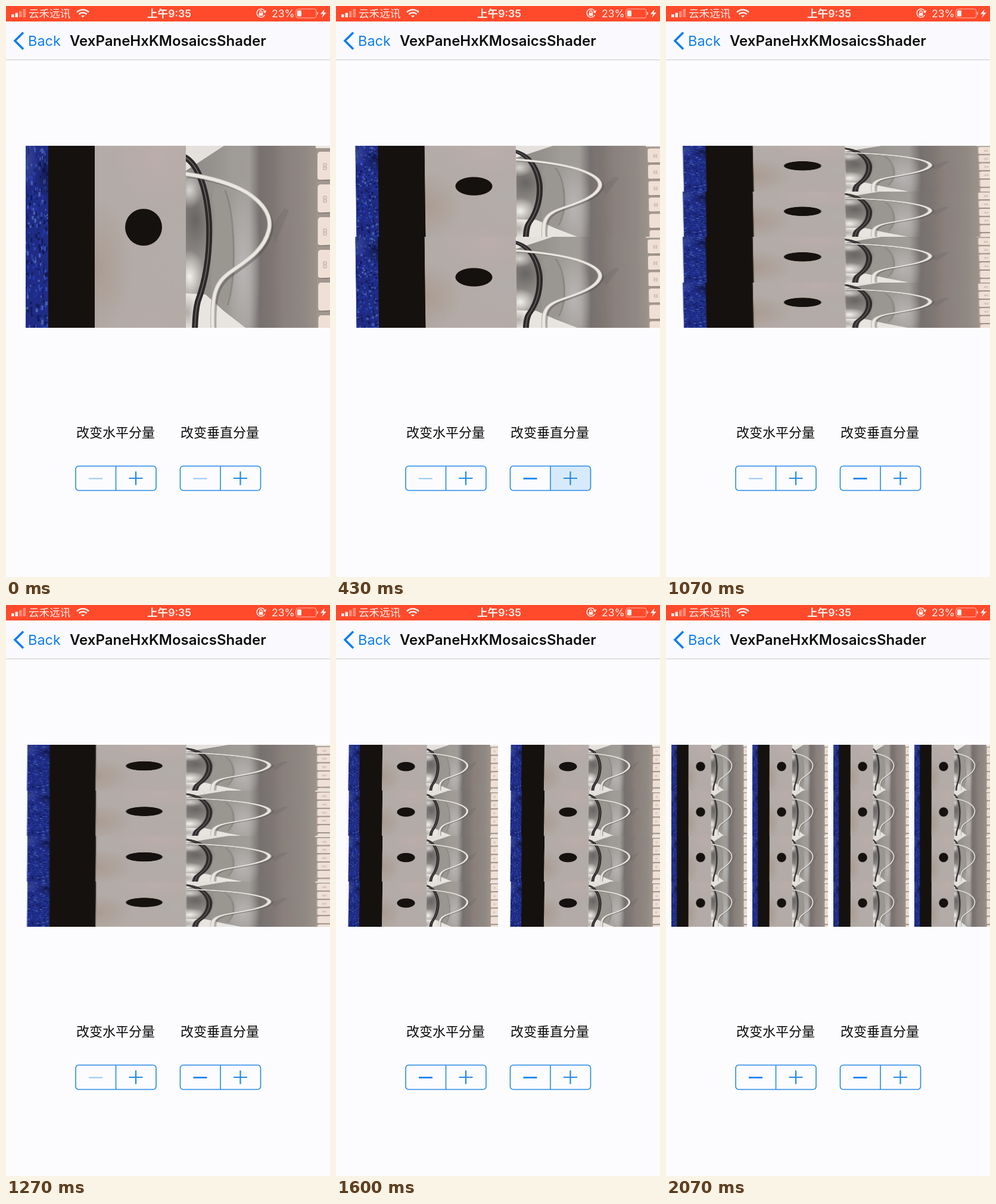
An HTML page with a canvas that plays this animation: 544x960 px, repeating every 2.11 s.

```html
<!DOCTYPE html>
<html lang="zh-CN">
<head>
<meta charset="utf-8">
<style>
html, body { margin: 0; width: 100%; height: 100%; overflow: hidden; background: #fcfcfe; }
svg, canvas { position: absolute; left: 0; top: 0; }
canvas { top: 235px; }
text { font-family: Inter, "Noto Sans CJK SC", "Noto Sans CJK", sans-serif; }
.line { fill: none; stroke: #2489e6; stroke-width: 1.6; }
.bar { fill: #fff0ec; }
.wire { fill: none; stroke: #fff0ec; }
</style>
</head>
<body>
<svg width="544" height="960" viewBox="0 0 544 960">
  <rect width="544" height="26" fill="#ff4a2c"/>
  <g class="bar" font-size="17.6">
    <path d="M9 14h4.500v5H9zM15.500 11.500H20V19h-4.500z"/>
    <path d="M22 8.500h4.500V19H22zM28.500 5H33v14h-4.500z" opacity=".4"/>
    <text x="38" y="19">云禾远讯</text>
    <text x="274" y="19" font-weight="600" text-anchor="middle">上午9:35</text>
    <text x="446" y="19">23%</text>
    <rect x="489" y="7.500" width="7" height="10" rx="1"/>
    <path d="M522.500 9.500q3 3 0 6zM535 5l-7 8.500h4.500L530 20l8-9h-4.500z"/>
    <rect x="424.500" y="11.500" width="7" height="5" rx="1"/>
  </g>
  <g class="wire">
    <path d="M119 10.500a14 14 0 0 1 20 0M122.500 14a9 9 0 0 1 13 0" stroke-width="2.600"/>
    <path d="M126.500 16.500h5l-2.500 2.500z" fill="#fff0ec"/>
    <rect x="487" y="5" width="34" height="15" rx="3.500" opacity=".7"/>
    <path d="M426 12v-2a2 2 0 0 1 4 0v2M434.500 15a7 7 0 1 1 .5-4.500m1.500-3l-1.500 3.500l-3-1.500" stroke-width="1.400"/>
  </g>
  <rect y="26" width="544" height="64" fill="#fafafe"/>
  <path d="M0 90.500h544" stroke="#c9c9cd"/>
  <path d="M29 44.500L15 58.500L29 72.500" fill="none" stroke="#0a7cf5" stroke-width="3.600"/>
  <text x="37" y="67" font-size="23.500" fill="#0f7ef2">Back</text>
  <text x="107" y="67" font-size="24" font-weight="600" fill="#0b0b0b">VexPaneHxKMosaicsShader</text>
  <g font-size="22" fill="#0a0a0a">
    <text x="118" y="725">改变水平分量</text>
    <text x="293" y="725">改变垂直分量</text>
  </g>
  <g id="steppers"></g>
</svg>
<canvas id="view" width="544" height="306"></canvas>
<script>
const LOOP = 2110, W = 544, H = 306, HOLD = 100;
const view = document.getElementById('view').getContext('2d');
const photo = document.createElement('canvas');
photo.width = W;
photo.height = H;
const c = photo.getContext('2d');
view.imageSmoothingQuality = 'high';

// Moments at which each plus button is pressed
const presses = { across: [1300, 1620, 1930], down: [400, 650, 930] };

// Hand-held camera: time, zoom, vertical drift, lean
const camera = [
  [0, 1, 0, 0], [430, 1.002, -1, 2], [770, 1.01, -1, 2], [1070, 1.013, -2, 2],
  [1430, .977, 11, -3], [1770, .972, 8, -2], [2070, .992, 9, -1], [LOOP, .992, 9, -1]
];

const steppers = ['across', 'down'].map((name, i) => {
  const g = document.createElementNS('http://www.w3.org/2000/svg', 'g');
  g.setAttribute('transform', `translate(${i * 175.5} 0)`);
  g.innerHTML = `<path d="M184.500 774h63q4.500 0 4.500 4.500v31.500q0 4.500 -4.500 4.500h-63z" fill="#d7eafc"/>
    <rect class="line" x="117" y="773.500" width="135" height="41" rx="5"/>
    <path class="line" d="M184.500 773.500v41"/>
    <path d="M139 794.500h23"/>
    <path class="line" style="stroke-width:2.200" d="M206.500 794h23M218 782.500v23"/>`;
  document.getElementById('steppers').append(g);
  return { times: presses[name], glow: g.children[0], minus: g.children[3] };
});

function poly(color, ...p) {
  c.fillStyle = color;
  c.beginPath();
  for (let i = 0; i < p.length; i += 2) c.lineTo(p[i], p[i + 1]);
  c.fill();
}

function box(color, x, y, w, h) {
  c.fillStyle = color;
  c.fillRect(x, y, w, h);
}

function curve(color, width, path) {
  c.strokeStyle = color;
  c.lineWidth = width;
  c.stroke(new Path2D(path));
}

// Soft oval of light, given as an r,g,b triple
function haze(rgb, alpha, x, y, rx, ry) {
  c.save();
  c.translate(x, y);
  c.scale(rx, ry);
  const g = c.createRadialGradient(0, 0, 0, 0, 0, 1);
  g.addColorStop(0, `rgba(${rgb},${alpha})`);
  g.addColorStop(1, `rgba(${rgb},0)`);
  box(g, -1, -1, 2, 2);
  c.restore();
}

function inside(x, w, draw) {
  c.save();
  c.beginPath();
  c.rect(x, -30, w, 370);
  c.clip();
  draw();
  c.restore();
}

function screen() {
  box('#1f2c86', 33, -30, 39, 370);
  let seed = 7;
  const rnd = () => (seed = seed * 16807 % 2147483647) / 2147483647;
  const blues = ['#2f4cab', '#121a55', '#2438ae', '#4a63b0', '#141c5c'];
  for (let i = 0; i < 330; i++) {
    box(blues[i % 5], 33 + rnd() * 36, -30 + rnd() * 365, 1 + rnd() * 3, 2 + rnd() * 6);
  }
  haze('80,100,165', .45, 36, 25, 18, 50);
  haze('12,14,50', .55, 68, 50, 20, 45);
}

function panel() {
  box('#b3aba7', 149, -30, 153, 370);
  haze('190,174,172', .7, 255, 20, 80, 90);
  haze('167,150,138', .7, 152, 205, 60, 120);
  haze('182,171,168', .6, 245, 300, 90, 65);
  haze('177,174,173', .6, 285, 170, 50, 90);
}

function desk() {
  const g = c.createLinearGradient(302, 0, 524, 0);
  [[0, '#8e8b88'], [.2, '#95918d'], [.35, '#9f9c98'], [.48, '#a09c98'], [.56, '#767170'],
   [.66, '#7d7673'], [.74, '#8a817d'], [.9, '#8f8883'], [1, '#9c938b']].forEach(s => g.addColorStop(...s));
  box(g, 302, -30, 222, 370);
  haze('186,184,184', .9, 398, 205, 30, 150);
  haze('140,124,120', .35, 463, 215, 30, 110);
  poly('#9a9692', 352, 68, 372, 95, 382, 150, 383, 210, 376, 250, 360, 275, 345, 250, 342, 100);
  curve('rgba(105,102,98,.4)', 3, 'M368 75C385 120 388 220 372 268');
  haze('70,68,68', .55, 318, 125, 35, 70);
  haze('248,246,242', .95, 308, 220, 27, 45);
  haze('234,232,228', .8, 308, 75, 22, 30);
  poly('#e4e1dd', 302, -30, 410, -30, 366, 0, 302, 42);
  poly('#e8e5e1', 302, 248, 335, 250, 366, 278, 402, 306, 440, 340, 302, 340);
  haze('120,117,114', .5, 304, 280, 18, 30);
  poly('rgba(110,105,102,.35)', 444, 140, 467, 105, 475, 108, 452, 165);
}

function cables() {
  const black = 'M298 18C325 30 338 80 341 130C343 190 332 235 322 262Q316 285 317 340';
  curve('#2b2829', 10, black);
  curve('#6c6867', 1.6, black);
  const white = 'M300 47C335 52 375 61 405 79C434 98 447 120 441 143C433 175 405 192 380 210C350 230 342 250 349 340';
  c.save();
  c.translate(4, 4);
  curve('rgba(75,72,70,.4)', 5, white);
  c.restore();
  curve('#bbb6b0', 7.5, white);
  curve('#ebe8e3', 5, white);
}

function keys() {
  box('#a2978f', 522, -30, 60, 370);
  box('#eee7e0', 520, -30, 60, 34);
  for (let i = 0; i < 7; i++) {
    const y = 10 + i * 55;
    c.beginPath();
    c.roundRect(523 + i * .3, y, 50, 48, 5);
    c.fillStyle = '#efdfd4';
    c.fill();
    curve('#746a64', 1.2, `M${524 + i * .3} ${y + 48}L580 ${y + 46}`);
    if (i < 4) {
      c.strokeStyle = '#b5a9a1';
      c.lineWidth = 1;
      c.strokeRect(533, y + 20, 5, 4);
      c.strokeRect(533, y + 26, 5, 4);
    }
  }
}

function drawPhoto([zoom, drift, lean]) {
  c.setTransform(1, 0, 0, 1, 0, 0);
  box('#fcfcfe', 0, 0, W, H);
  c.setTransform(zoom, 0, lean / H, 1, 430 * (1 - zoom), drift);
  inside(33, 39, screen);
  box('#15110f', 71, -30, 78.5, 370);
  inside(149, 153.5, panel);
  c.fillStyle = '#15110f';
  c.beginPath();
  c.arc(231, 137, 31, 0, 7);
  c.fill();
  inside(302, 222, () => { desk(); cables(); });
  keys();
}

function pose(t) {
  const i = camera.findIndex(k => k[0] > t), a = camera[i - 1], b = camera[i];
  const f = (t - a[0]) / (b[0] - a[0]);
  return a.slice(1).map((v, j) => v + (b[j + 1] - v) * f);
}

function frame() {
  const t = performance.now() % LOOP;
  const [cols, rows] = steppers.map(({ times, glow, minus }) => {
    const count = 1 + times.filter(p => p <= t).length;
    const pressed = times.some(p => t >= p && t < p + HOLD);
    glow.setAttribute('visibility', pressed ? 'visible' : 'hidden');
    minus.setAttribute('stroke', count > 1 ? '#0a7cf0' : '#94c5f2');
    minus.setAttribute('stroke-width', count > 1 ? 2.6 : 2);
    return count;
  });
  drawPhoto(pose(t));
  const w = W / cols, h = H / rows;
  for (let x = 0; x < cols; x++) {
    for (let y = 0; y < rows; y++) view.drawImage(photo, x * w, y * h, w, h);
  }
  requestAnimationFrame(frame);
}
frame();
</script>
</body>
</html>
```
